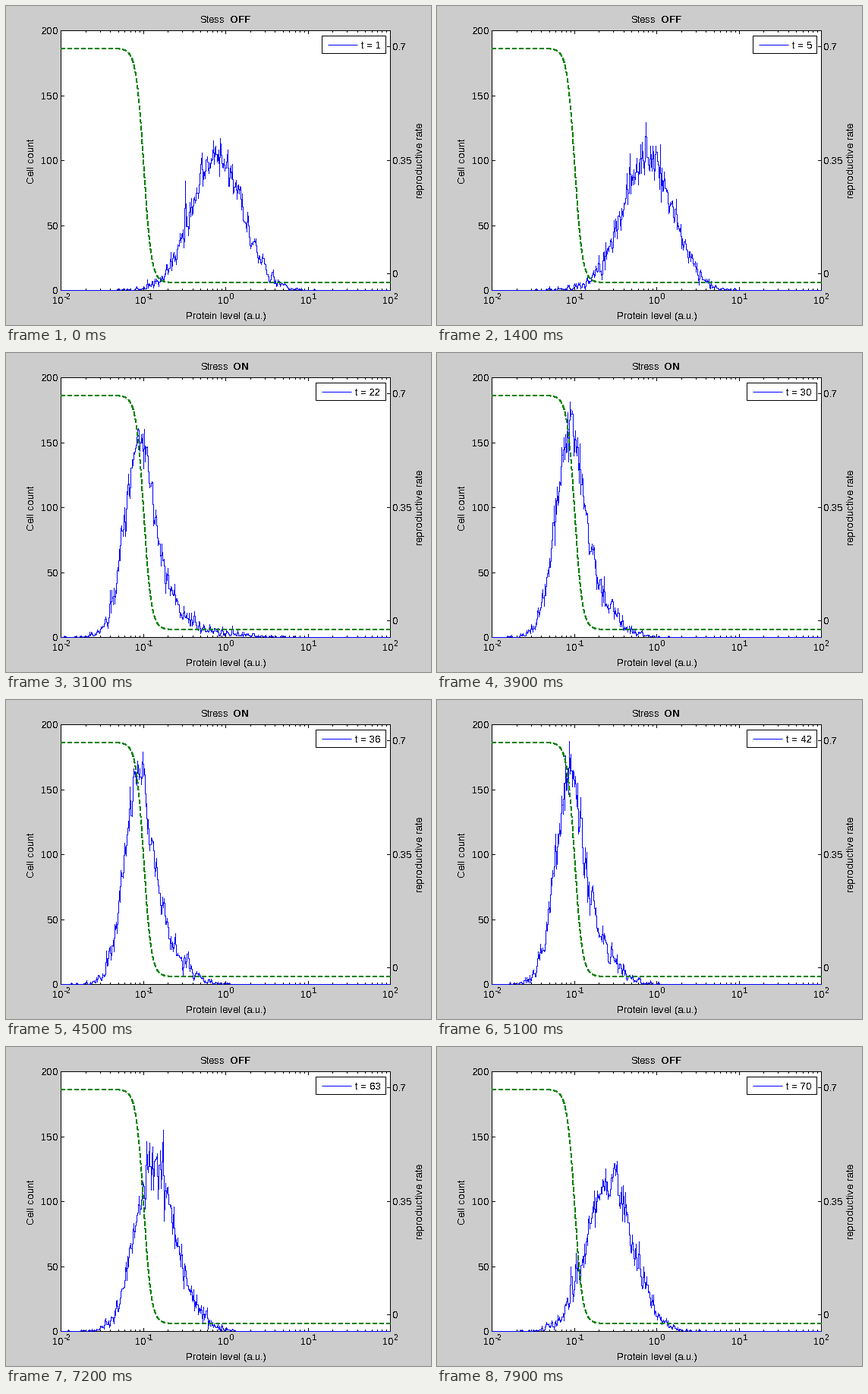
Write a matplotlib script that moves like this. It is 560 px wide and 420 px high and loops after 8000 ms.

```python
import numpy as np
import matplotlib.pyplot as plt
from matplotlib.animation import FuncAnimation
from matplotlib.patches import Rectangle

W, H, DPI = 560, 420, 100
PX = 72 / DPI                      # one pixel in points
L, R, TOP, BOT = 72.5, 506.5, 32.5, 374.5
DEC = (R - L) / 4                  # pixels per decade
UNIT = (BOT - TOP) / 200           # pixels per cell
BLUE, GREEN = "#0000ff", "#008000"
ON_FROM, ON_TO = 6, 60             # steps with stress
HOLD, STEPS = 10, 70

plt.rcParams["font.family"] = "Liberation Sans"
plt.rcParams["text.antialiased"] = False
plt.rcParams["text.hinting_factor"] = 1
plt.rcParams["path.snap"] = False

fig = plt.figure(figsize=(W / DPI, H / DPI), dpi=DPI, facecolor="#cccccc")
ax = fig.add_axes([0, 0, 1, 1])
ax.set_xlim(0, W)
ax.set_ylim(H, 0)
ax.axis("off")


def line(x, y, color="k", **kw):
    return ax.plot(x, y, color=color, lw=PX, solid_capstyle="butt", **kw)[0]


def text(x, y, s, size=13.2, **kw):
    return ax.text(x, y, s, fontsize=size * PX, va="baseline", **kw)


def centre(v):
    """Centre of the pixel that holds v."""
    return np.floor(np.asarray(v) + 1e-6) + 0.5


def px(log_x):
    return centre(L + (log_x + 2) * DEC)


def draw_axes():
    ax.add_patch(Rectangle((L, TOP), R - L, BOT - TOP, fc="w", ec="none"))
    line([L, R, R, L, L], [TOP, TOP, BOT, BOT, TOP], zorder=2)
    for e in range(-2, 3):
        for m in range(1, 10 if e < 2 else 2):
            x, n = px(e + np.log10(m)), 4.5 if m == 1 else 2.5
            line([x, x], [BOT, BOT - n])
            line([x, x], [TOP, TOP + n])
        x = px(e) - (11 if e < 0 else 10)
        text(x, 392, "10")
        text(x + 15, 386, f"{e}".replace("-", "\u2010"), 10)
    for v in range(0, 201, 50):
        y = centre(BOT - v * UNIT)
        line([L, L + 4.5], [y, y])
        text(69.5, y + 4.7, str(v), ha="right")
    for v in (0, 0.35, 0.7):
        y = centre(352.5 - 427 * v)
        line([R - 4.5, R], [y, y])
        text(509.5, y + 4.7, f"{v:g}")
    text(290, 412, "Protein level (a.u.)", 13, ha="center")
    side = dict(rotation=90, rotation_mode="anchor", ha="center")
    text(37, 204, "Cell count", **side)
    text(549.5, 203.5, "reproductive rate", **side)


def bump(x, mean, left, right, amp):
    s = np.where(x < mean, left, right)
    return amp * np.exp(-0.5 * ((x - mean) / s) ** 2)


def expected(x, t):
    """Mean histogram: selection under stress, then drift back upwards."""
    w = 1 / (1 + np.exp(-0.5 * (t - 15.3)))
    decay = np.exp(-0.065 * max(0, t - ON_TO))

    def relaxed(mean, left, right, amp):
        def spread(s):
            return np.sqrt((s * decay) ** 2 + 0.295 ** 2 * (1 - decay ** 2))
        a, b = spread(left), spread(right)
        return bump(x, -0.11 + (mean + 0.11) * decay, a, b,
                    amp * (left + right) / (a + b))

    low = relaxed(-1.06, 0.17, 0.15, 131) + relaxed(-0.86, 0.27, 0.27, 42)
    if t >= ON_FROM:
        low = low + bump(x, -1.5, 0.18, 0.18, 0.25 * decay ** 3)
    return w * low + (1 - w) * bump(x, -0.11, 0.31, 0.31, 105)


def staircase(x, y):
    """Join points with whole-pixel vertical runs, without slanted edges."""
    mid = centre((y[:-1] + y[1:]) / 2)
    sx = np.column_stack([x[:-1], x[:-1], x[1:], x[1:]]).ravel()
    sy = np.column_stack([y[:-1], mid, mid, y[1:]]).ravel()
    return sx, sy


draw_axes()
bins = np.linspace(-2, 2, 400)
hist = line([], [], BLUE, zorder=3, solid_joinstyle="round")

gx = np.linspace(L, R, 900)
gy = 56 + 308 / (1 + np.exp(-(gx - 181.4) / 5))
# without antialiasing every touched pixel is filled, so this shows 2 px wide
line(gx, gy, GREEN, zorder=4, dashes=(5.2, 3.8), dash_capstyle="butt",
     antialiased=False)

box = Rectangle((416.5, 39.5), 84, 23, fc="w", ec="k", lw=PX, zorder=5)
ax.add_patch(box)
sample = line([], [], BLUE, zorder=6)
label = text(468, 56, "", zorder=6)
title = text(256, 22, "")
state = text(295, 22, "", weight="bold")


def update(i):
    t = max(1, i - HOLD + 1)
    rng = np.random.default_rng(t)
    counts = np.minimum(rng.poisson(expected(bins, t)), 196)
    hist.set_data(*staircase(px(bins), centre(BOT - counts * UNIT)))

    x = 416.5 if t < 10 else 408.5
    box.set_x(x)
    box.set_width(500.5 - x)
    sample.set_data([x + 8, x + 47], [51.5, 51.5])
    label.set_x(x + 52)
    label.set_text(f"t = {t}")

    on = ON_FROM <= t <= ON_TO
    title.set_text("Stress" if on else "Stess")
    title.set_x(257 if on else 256)
    state.set_text("ON" if on else "OFF")
    state.set_x(299.5 if on else 295)
    return hist, box, sample, label, title, state


anim = FuncAnimation(fig, update, frames=HOLD + STEPS, interval=100,
                     repeat=True, repeat_delay=0, blit=False)
plt.show()
```
